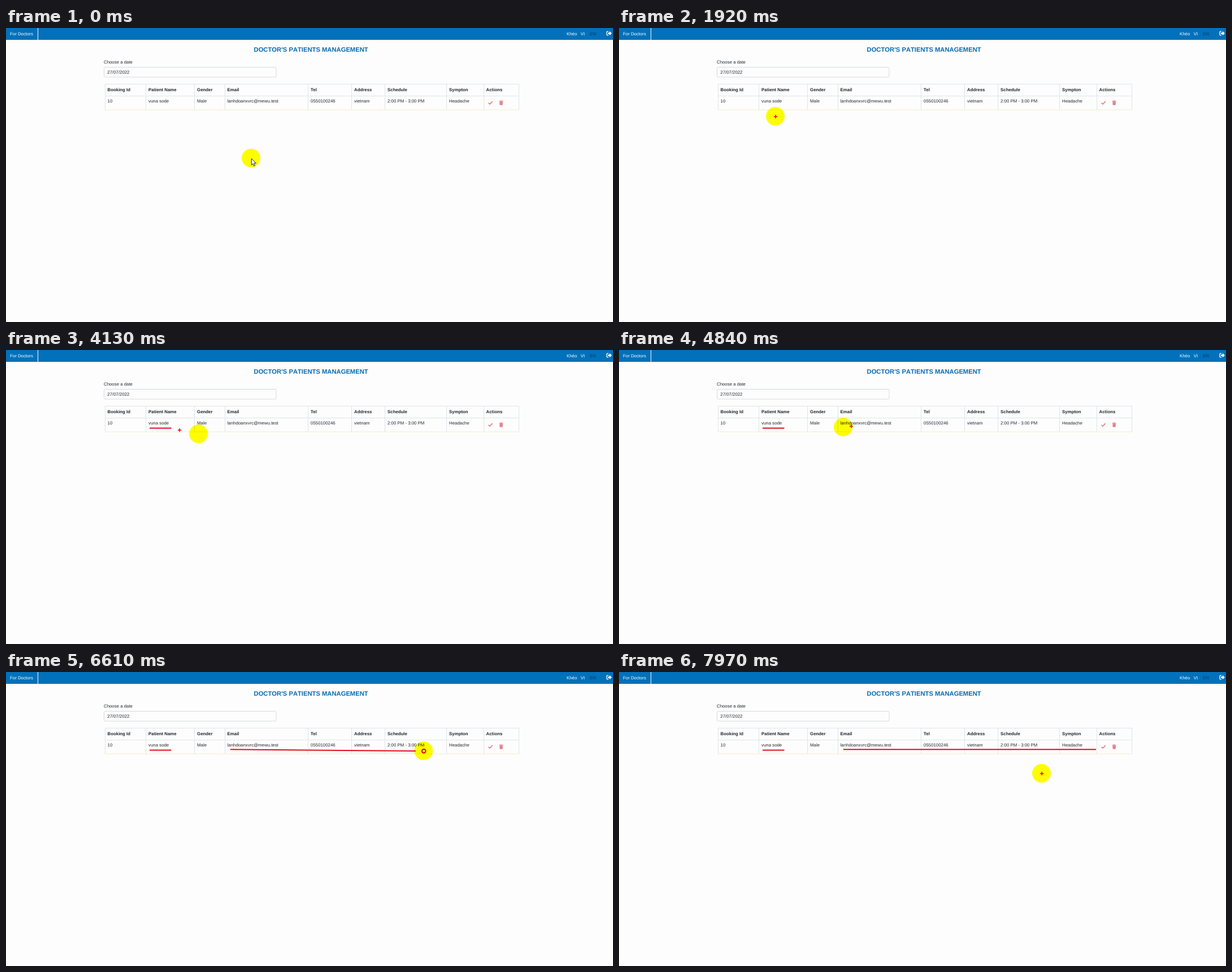
An HTML page that plays this animation: 1074 px wide and 521 px high, repeating every 8 s.

```html
<!DOCTYPE html>
<html lang="en">
<head>
<meta charset="utf-8">
<title>Patients management</title>
<style>
  html, body { margin: 0; width: 100%; height: 100%; overflow: hidden; background: #fdfdfd; }
  svg { display: block; width: 1074px; height: 521px; font: 7.83px "Liberation Sans", Arial, sans-serif; fill: #25282d; text-rendering: geometricPrecision; }
  .bar text { fill: #fff; }
  .bar .off { fill: #0c3a68; }
  .title { font-size: 11.22px; font-weight: bold; font-kerning: none; fill: #076bb0; }
  .head { font-weight: bold; fill: #212529; }
  .grid { fill: none; stroke: #dfe4ea; shape-rendering: crispEdges; }
  .ink { stroke: #e6081a; stroke-width: 2; }
  .pen { fill: none; stroke: #dc0a14; }
  #glow { fill: #ff0; mix-blend-mode: multiply; }
</style>
</head>
<body>
<svg viewBox="0 0 1074 521">
  <rect width="1074" height="521" fill="#fdfdfd"/>
  <g class="bar">
    <rect width="1074" height="21" fill="#0071ba"/>
    <path d="M56.5 0V21" stroke="#fff"/>
    <text x="7" y="13">For Doctors</text>
    <text x="992" y="13">Khéo</text>
    <text x="1016.7" y="13">VI</text>
    <text x="1033" y="13" class="off">EN</text>
    <path d="M1066 6.1H1064Q1062.9 6.1 1062.9 7.2V11.7Q1062.9 12.8 1064 12.8H1066" fill="none" stroke="#fff" stroke-width="1.3"/>
    <path d="M1065 8.2H1067.8V5.6L1071.9 9.5L1067.8 13.3V10.8H1065Z" fill="#fff"/>
  </g>
  <text class="title" x="539.6" y="42.1" text-anchor="middle">DOCTOR'S PATIENTS MANAGEMENT</text>
  <text x="173" y="63.2">Choose a date</text>
  <rect x="173.5" y="69.5" width="304.5" height="17.5" rx="2" fill="#fdfdfd" stroke="#d5dae0"/>
  <text x="179.3" y="80.7">27/07/2022</text>
  <g id="table"></g>
  <path d="M853.6 132.7L856 135L860.8 130.1" fill="none" stroke="#e66a6c" stroke-width="1.5"/>
  <path d="M872.8 128.9H875L875.5 128.4H877L877.5 128.9H879.5V130H872.8ZM873.3 130.5H879L878.6 136.6H873.7Z" fill="#e2707c"/>
  <path d="M874.9 131.6V135.5M876.2 131.6V135.5M877.5 131.6V135.5" stroke="#eea6ac" stroke-width=".5"/>
  <line id="nameLine" class="ink" x1="254" y1="138.4"/>
  <line id="restLine" class="ink" x1="397" y1="137.2"/>
  <circle id="ring" class="pen" r="3.4" stroke-width="2"/>
  <circle id="glow" cx="-.4" cy="-.6" r="16.5"/>
  <path id="cross" class="pen" d="M-3 0H3.4M.2 -3.2V3.2" stroke-width="1.5"/>
  <path id="arrow" d="M.3 .3V11.8L2.9 9.4L4.7 13.5L6.6 12.7L4.8 8.7H8.4Z" fill="#fff" stroke="#111" stroke-width=".9"/>
</svg>
<script>
  const LOOP = 8000, TICK = 50;
  const $ = id => document.getElementById(id);

  const columns = [
    [175, "Booking Id", "10"],
    [247.5, "Patient Name", "vuna sode"],
    [333.5, "Gender", "Male"],
    [387, "Email", "lanhdoanxvrc@mewu.test"],
    [534.5, "Tel", "0550100246"],
    [611.5, "Address", "vietnam"],
    [670.5, "Schedule", "2:00 PM - 3:00 PM"],
    [779.5, "Sympton", "Headache"],
    [845, "Actions", ""]
  ];
  $("table").innerHTML =
    `<path class="grid" d="M175 99.5H908M175 120H908M907.5 99V145"/>` +
    `<path d="M175 145H908" stroke="#efedcc"/>` +
    columns.map(([x, head, cell]) => `
      <path class="grid" d="M${x} 99V145"/>
      <text class="head" x="${x + 4.6}" y="112.2">${head}</text>
      <text x="${x + 4.6}" y="132.4">${cell}</text>`).join("");

  // Each move starts where the last one ended; a bend makes it a curve.
  const HOME = [434, 231], EVEN = 1, SLOWING = 1.55;
  const moves = [
    { start: 50, time: 350, ease: EVEN, bend: [430, 214], to: [434, 235] },
    { start: 710, time: 650, ease: EVEN, bend: [232, 131], to: [277, 157] },
    { start: 1920, time: 800, ease: EVEN, bend: [240, 125], to: [254, 138.4] },
    { start: 2770, time: 760, ease: EVEN, to: [289, 138.4] },
    { start: 3580, time: 450, ease: EVEN, to: [273, 135] },
    { start: 4030, time: 200, ease: EVEN, to: [409, 163] },
    { start: 4390, time: 450, ease: EVEN, bend: [466, 125], to: [397, 137.2] },
    { start: 5240, time: 760, ease: SLOWING, to: [506, 139.2] },
    { start: 6050, time: 760, ease: SLOWING, to: [776, 140.2] },
    { start: 6860, time: 550, ease: SLOWING, to: [845, 138] },
    { start: 7610, time: 300, ease: SLOWING, to: [748, 180] }
  ];

  function at(t) {
    let p = HOME;
    for (const { start, time, ease, bend, to } of moves) {
      if (t < start) break;
      const k = 1 - (1 - Math.min(1, (t - start) / time)) ** ease;
      p = p.map((a, i) => {
        const mid = bend ? bend[i] : (a + to[i]) / 2;
        return a * (1 - k) ** 2 + 2 * mid * k * (1 - k) + to[i] * k * k;
      });
    }
    return p;
  }

  const strokes = [
    { id: "nameLine", from: 2770, until: 3530, end: [292.5, 138.4] },
    { id: "restLine", from: 5240, until: 7610, end: [844, 137.2] }
  ];

  const show = (id, on) => { $(id).style.display = on ? "" : "none"; };
  const place = (id, [x, y]) => $(id).setAttribute("transform", `translate(${x} ${y})`);

  function draw() {
    const now = performance.now() % LOOP;
    const start = moves.reduce((s, m) => m.start <= now ? m.start : s, 0);
    const t = start + Math.floor((now - start) / TICK) * TICK;
    const spot = at(t), late = at(t - TICK);
    const drawing = strokes.some(s => t >= s.from && t < s.until);

    for (const id of ["glow", "arrow", "ring"]) place(id, spot);
    place("cross", late);
    show("arrow", t < 1920);
    show("ring", drawing);
    show("cross", t >= 1920 && !drawing);

    for (const { id, from, until, end } of strokes) {
      const [x, y] = t < until ? late : end;
      show(id, t >= from);
      $(id).setAttribute("x2", x);
      $(id).setAttribute("y2", y);
    }
    requestAnimationFrame(draw);
  }
  draw();
</script>
</body>
</html>
```
